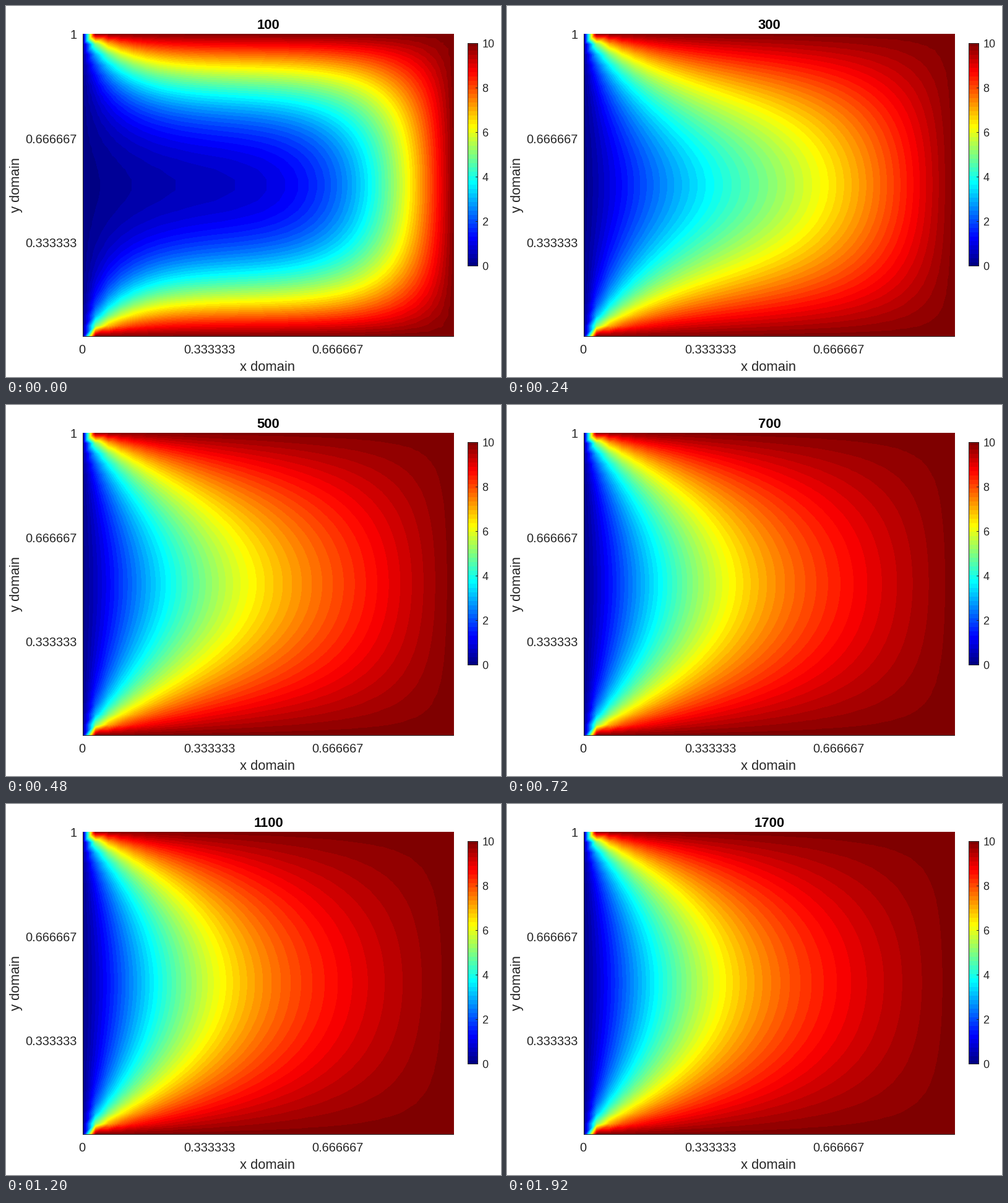
Animation of 800 by 600 pixels, one loop 2.04 s. Source, as a matplotlib script:

```python
import numpy as np
import matplotlib.pyplot as plt
from matplotlib.animation import FuncAnimation
from matplotlib.colors import ListedColormap
from matplotlib.patches import Rectangle

W, H, DPI = 800, 600, 100
PX = 72 / DPI                      # one pixel in points
LEFT, RIGHT, TOP, BOTTOM = 124, 724, 45, 534
N = 30                             # grid points per side
RATE = 0.225                       # diffusion number of one step
STEPS = 100                        # steps per picture
FRAMES, INTERVAL = 17, 120
INK = (0.15, 0.15, 0.15)

plt.rcParams["font.family"] = "Liberation Sans"


def banded_jet():
    """Jet ramp of 256 entries, rounded to steps of five."""
    j = (np.arange(256) + 2) // 5 * 5

    def ramp(shift):
        return np.clip(np.minimum(j - 31 - shift, 223 + shift - j) / 64, 0, 1)

    return ListedColormap(np.column_stack([ramp(64), ramp(0), ramp(-64)]))


def solve():
    """Heat spreading in a square: left side cold, other sides at 10."""
    u = np.zeros((N, N))
    u[0] = u[-1] = 10
    u[:, -1] = 10
    u[:, 0] = 0
    shots = []
    for _ in range(FRAMES):
        for _ in range(STEPS):
            near = u[:-2, 1:-1] + u[2:, 1:-1] + u[1:-1, :-2] + u[1:-1, 2:]
            u[1:-1, 1:-1] += RATE * (near - 4 * u[1:-1, 1:-1])
        shots.append(u.copy())
    return shots


def cells(size):
    """Grid cell and place within it for each pixel centre."""
    pos = (np.arange(size) + 0.5) / size * (N - 1)
    cell = pos.astype(int)
    return cell, pos - cell


def shade(u):
    """Interpolate over two triangles per cell."""
    r, fy = cells(BOTTOM - TOP)
    c, fx = cells(RIGHT - LEFT)
    r, fy = r[:, None], fy[:, None]
    tl, tr, bl, br = u[r, c], u[r, c + 1], u[r + 1, c], u[r + 1, c + 1]
    upper = tl + fx * (tr - tl) + fy * (bl - tl)
    lower = br + (1 - fx) * (bl - br) + (1 - fy) * (tr - br)
    return np.where(fx + fy < 1, upper, lower)


pictures = [shade(u) for u in solve()]

fig = plt.figure(figsize=(W / DPI, H / DPI), dpi=DPI, facecolor="white")
ax = fig.add_axes([0, 0, 1, 1])
cmap = banded_jet()


def show(data, extent):
    return ax.imshow(data, extent=extent, cmap=cmap, vmin=0, vmax=10,
                     interpolation="nearest", aspect="auto")


def label(x, y, s, size, ha="center", **kw):
    kw.setdefault("color", INK)
    return ax.text(x, y, s, fontsize=size * PX, ha=ha, va="baseline", **kw)


def bar(x, y, w=1, h=1):
    ax.add_patch(Rectangle((x, y), w, h, fc=INK, lw=0, zorder=3))


field = show(pictures[0], (LEFT, RIGHT, BOTTOM, TOP))
bar(LEFT, TOP, h=BOTTOM - TOP)
bar(LEFT, BOTTOM, w=RIGHT - LEFT)

for k, name in enumerate(["0", "0.333333", "0.666667"]):
    label(123 + k * 206.3, 562, name, 20)
for k, name in enumerate(["1", "0.666667", "0.333333"]):
    label(115, 53 + k * 168.6, name, 20, ha="right")

label(423, 590, "x domain", 22)
label(22.5, 290, "y domain", 22, rotation=90, rotation_mode="anchor")
title = label(424, 37, "", 22, weight="bold", color="black")

# colour bar
BAR_L, BAR_R, BAR_T, BAR_B = 747, 762, 60, 420
show(np.linspace(10, 0, BAR_B - BAR_T)[:, None], (BAR_L, BAR_R, BAR_B, BAR_T))
for x in (BAR_L - 1, BAR_R):
    bar(x, BAR_T, h=BAR_B - BAR_T + 1)
for y in (BAR_T, BAR_B):
    bar(BAR_L, y, w=BAR_R - BAR_L)
for v in range(0, 11, 2):
    y = BAR_B - v * (BAR_B - BAR_T) // 10
    bar(BAR_R - 3, y, w=3)
    label(769.5, y + 7, str(v), 18, ha="left")

ax.set_xlim(0, W)
ax.set_ylim(H, 0)
ax.axis("off")


def update(i):
    field.set_data(pictures[i])
    title.set_text(str((i + 1) * STEPS))
    return field, title


anim = FuncAnimation(fig, update, frames=FRAMES, interval=INTERVAL,
                     init_func=lambda: update(0), repeat=True)
plt.show()
```
